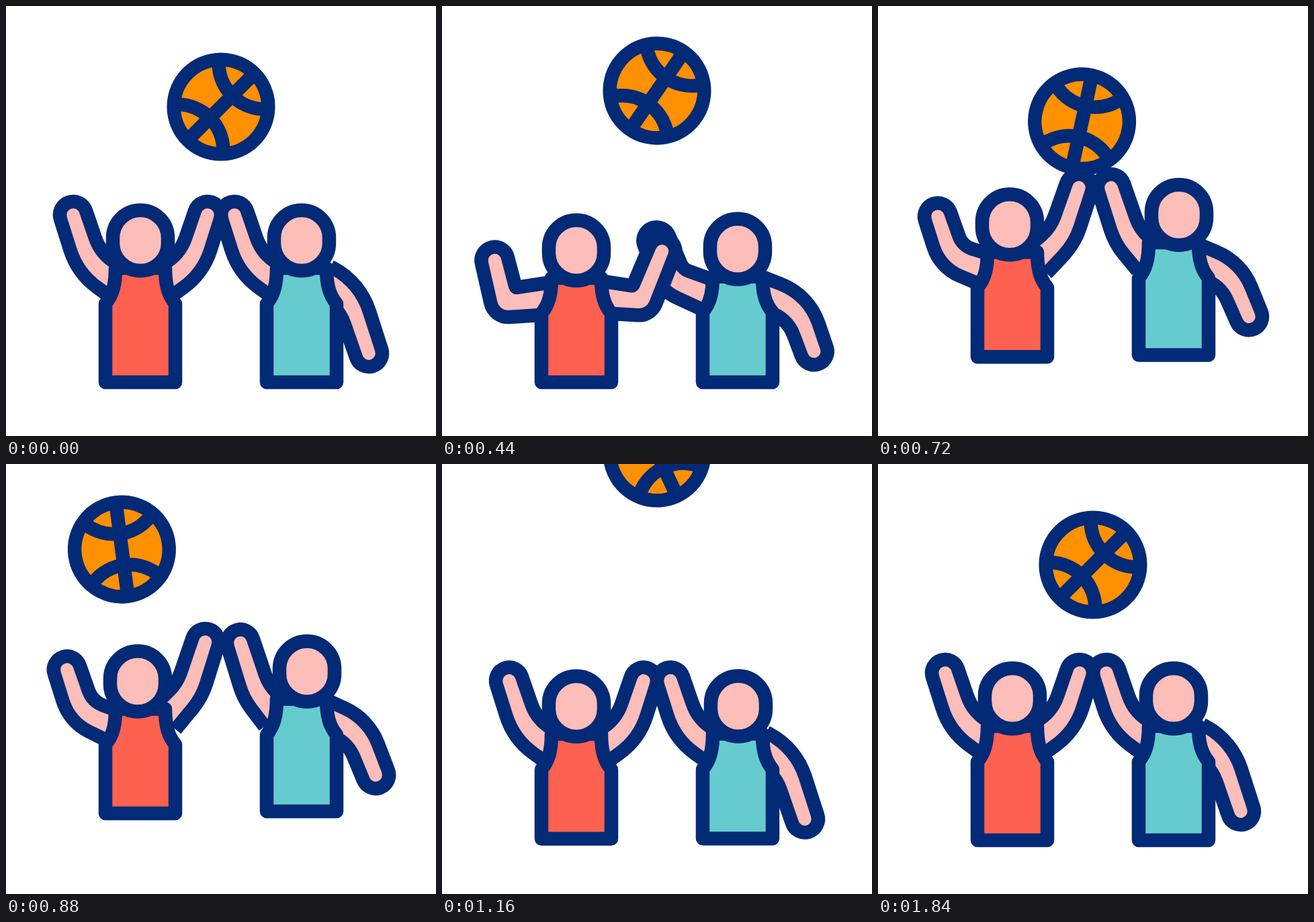
An HTML page with a canvas that plays this animation: 640 by 640 pixels, repeating every 2000 ms.

```html
<!DOCTYPE html>
<html lang="en">
<head>
<meta charset="utf-8">
<title>Jump ball</title>
<style>
  html, body { margin: 0; width: 100%; height: 100%; overflow: hidden; background: #fff; }
  canvas { display: block; width: 100vmin; height: 100vmin; }
</style>
</head>
<body>
<canvas id="stage" width="640" height="640"></canvas>
<script>
const ctx = document.getElementById('stage').getContext('2d');
const LOOP = 2000, STEP = 40;
const NAVY = '#032a76', SKIN = '#fdbdb9', ORANGE = '#ff9000';
const SQUAT = 14;

// Pose order: rest, crouch, jump, float, land, rest
const TIMES = [0, 480, 720, 1000, 1160, 1400];

// Arm pose: hand x y, elbow x y, shoulder x y, elbow radius
const players = [
  {
    x: 440, shirt: '#66cbcf', leap: 43,
    squat: [0, 13, 2.5, 3, SQUAT, 0],
    lean: [0, 0, 8, 8, 1, 0],
    arms: [
      [[340, 311, 364, 384, 398, 406, 90], [319, 350, 342, 408, 400, 432, 40],
       [347, 311, 371, 383, 398, 412, 90], [350, 308, 373, 381, 398, 412, 90]],
      [[540, 517, 510, 427, 480, 413, 90], [554, 514, 530, 447, 480, 430, 75],
       [552, 503, 525, 439, 480, 422, 75], [549, 508, 523, 439, 480, 421, 75]]
    ]
  },
  {
    x: 200, shirt: '#ff6150', leap: 40,
    squat: [0, 15, 14, 15, SQUAT, 0],
    lean: [0, 0, -4, -4, 0, 0],
    arms: [
      [[100, 311, 124, 384, 158, 406, 90], [78, 380, 93, 443, 160, 436, 5],
       [89, 351, 109, 411, 160, 430, 50], [92, 343, 113, 407, 160, 430, 60]],
      [[300, 311, 276, 384, 242, 406, 90], [328, 366, 298, 440, 240, 434, 5],
       [299, 308, 275, 379, 240, 413, 90], [295, 303, 272, 375, 240, 413, 90]]
    ]
  }
];

// Landing repeats the rest pose, pushed down by the squat
for (const p of players) {
  for (const poses of p.arms) {
    const rest = poses[0];
    poses.push(rest.map((v, i) => i < 6 && i % 2 ? v + SQUAT : v), rest);
  }
}

const lerp = (a, b, u) => a + (b - a) * u;
const ramp = (t, a, b) => {
  const u = Math.min(1, Math.max(0, (t - a) / (b - a)));
  return u * u * (3 - 2 * u);
};
const unit = (x, y) => {
  const l = Math.hypot(x, y) || 1;
  return [x / l, y / l];
};

function keyAt(t) {
  let i = 0;
  while (i < TIMES.length - 2 && t >= TIMES[i + 1]) i++;
  return [i, ramp(t, TIMES[i], TIMES[i + 1])];
}

function paint(fill) {
  ctx.fillStyle = fill;
  ctx.fill();
  ctx.stroke();
}

function drawArm([hx, hy, ex, ey, sx, sy, bend]) {
  const [ax, ay] = unit(ex - hx, ey - hy);
  const [bx, by] = unit(sx - ex, sy - ey);
  const cos = ax * bx + ay * by;
  const turn = Math.sign(ax * by - ay * bx);
  const tan = Math.tan(Math.acos(Math.max(-1, Math.min(1, cos))) / 2);
  sx += bx * 8;
  sy += by * 8;

  const side = s => {
    const k = s * 21 / (1 + cos);
    const hand = [hx - ay * 20 * s, hy + ax * 20 * s];
    const elbow = [ex - (ay + by) * k, ey + (ax + bx) * k];
    const shoulder = [sx - by * 24 * s, sy + bx * 24 * s];
    const room = Math.min(
      Math.hypot(hand[0] - elbow[0], hand[1] - elbow[1]),
      Math.hypot(shoulder[0] - elbow[0], shoulder[1] - elbow[1]));
    const r = Math.min(Math.max(2, bend - 20 * s * turn), 0.95 * room / (tan + 1e-6));
    return { hand, elbow, shoulder, r };
  };

  const p = side(1), q = side(-1);
  const start = Math.atan2(ax, -ay);
  ctx.beginPath();
  ctx.moveTo(...p.shoulder);
  ctx.arcTo(...p.elbow, ...p.hand, p.r);
  ctx.lineTo(...p.hand);
  ctx.arc(hx, hy, 20, start, start + Math.PI);
  ctx.arcTo(...q.elbow, ...q.shoulder, q.r);
  ctx.lineTo(...q.shoulder);
  paint(SKIN);
}

function drawShirt(x, dy, color) {
  const top = 390 + dy, low = 443 + dy;
  ctx.beginPath();
  ctx.moveTo(x - 37, top);
  ctx.bezierCurveTo(x - 37, top + 24, x - 41, low - 13, x - 52, low);
  ctx.lineTo(x - 52, 560);
  ctx.lineTo(x + 52, 560);
  ctx.lineTo(x + 52, low);
  ctx.bezierCurveTo(x + 41, low - 13, x + 37, top + 24, x + 37, top);
  ctx.closePath();
  paint(color);
}

function drawHead(x, y) {
  ctx.beginPath();
  ctx.arc(x, y - 4, 41, Math.PI, 0);
  ctx.arc(x, y + 4, 41, 0, Math.PI);
  ctx.closePath();
  paint(SKIN);
}

function drawPlayer(p, t) {
  const [i, u] = keyAt(t);
  const mix = list => lerp(list[i], list[i + 1], u);
  const lift = p.leap * (ramp(t, 480, 760) - ramp(t, 952, 1196));
  const squat = mix(p.squat);
  ctx.save();
  ctx.translate(0, -lift);
  for (const poses of p.arms) {
    drawArm(poses[i].map((v, n) => lerp(v, poses[i + 1][n], u)));
  }
  drawShirt(p.x, squat, p.shirt);
  drawHead(p.x + mix(p.lean), 349 + squat);
  ctx.restore();
}

function ballAt(t) {
  if (t < 600) return [320, 150 - 29 * ramp(t, 0, 600)];
  if (t < 700) return [320, 121 + 56.5 * ((t - 600) / 100) ** 2];
  if (t < 1140) return [320 - 0.82 * (t - 700), 177.5 - 0.28 * (t - 700)];
  if (t < 1400) return [320, 177 - 193 * ((1400 - t) / 240) ** 2];
  return [320, 177 - 27 * ramp(t, 1400, 1720)];
}

function spinAt(t) {
  const deg = t < 1140
    ? 70.5 * (t / 1000) ** 2.33
    : 70 * (Math.max(0, 1840 - t) / 680) ** 1.4;
  return -deg * Math.PI / 180;
}

function drawBall(t) {
  ctx.save();
  ctx.translate(...ballAt(t));
  ctx.rotate(spinAt(t) - Math.PI / 4);
  ctx.beginPath();
  ctx.arc(0, 0, 70.3, 0, Math.PI * 2);
  paint(ORANGE);
  ctx.clip();
  ctx.beginPath();
  ctx.moveTo(-70, 0);
  ctx.lineTo(70, 0);
  for (const c of [-91.8, 91.8]) {
    ctx.moveTo(c + 68.3, 0);
    ctx.arc(c, 0, 68.3, 0, Math.PI * 2);
  }
  ctx.stroke();
  ctx.restore();
}

function frame(now) {
  const t = Math.floor((now % LOOP) / STEP) * STEP;
  ctx.fillStyle = '#fff';
  ctx.fillRect(0, 0, 640, 640);
  ctx.strokeStyle = NAVY;
  ctx.lineWidth = 20.5;
  ctx.lineJoin = 'round';
  for (const p of players) drawPlayer(p, t);
  drawBall(t);
}

let begin = null;
function tick(now) {
  if (begin === null) begin = now;
  frame(Math.max(0, now - begin));
  requestAnimationFrame(tick);
}
frame(0);
requestAnimationFrame(tick);
</script>
</body>
</html>
```
